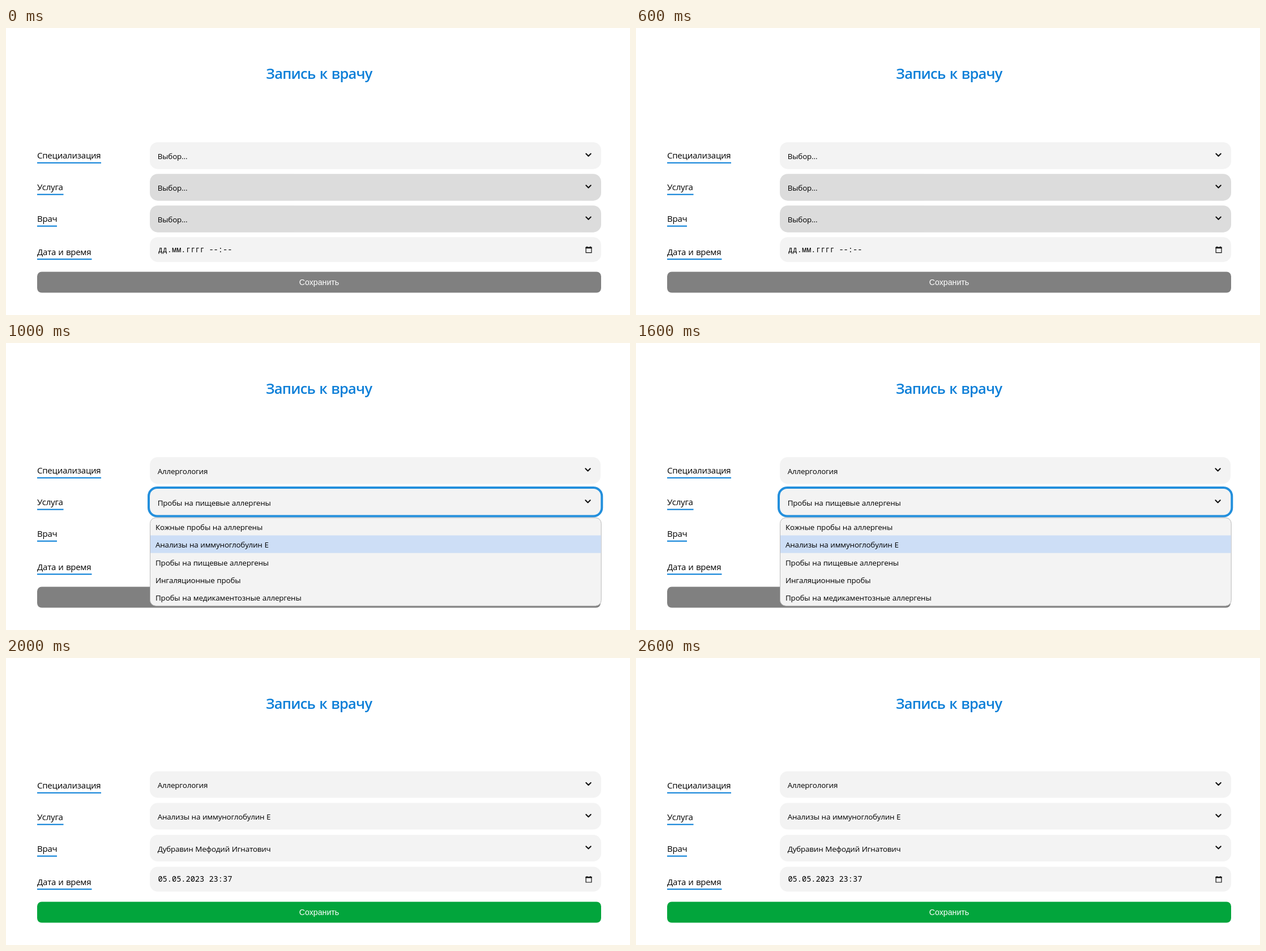
Recreate the animation shown at these times as an HTML page. Size 1102 by 508 pixels, loop 3 s.

```html
<!DOCTYPE html>
<html lang="ru">
<head>
<meta charset="utf-8">
<style>
  html, body { margin: 0; width: 100%; height: 100%; overflow: hidden; background: #fff; }
  svg { display: block; }
  text { font-family: "Open Sans", sans-serif; fill: #000; white-space: pre; }
  .title { font-size: 25.4px; font-weight: 600; letter-spacing: -.72px; word-spacing: 1.4px; fill: #0d7fd8; text-anchor: middle; }
  .label { font-size: 15px; letter-spacing: -.22px; word-spacing: .6px; }
  .value { font-size: 13.4px; letter-spacing: -.17px; word-spacing: .5px; }
  .date { font: 500 13.65px "Noto Sans Mono", monospace; }
  .button { font: 14.2px "Liberation Sans", Arial, sans-serif; fill: #fff; text-anchor: middle; }
  .icon { fill: none; stroke: #111; stroke-width: 2.1; stroke-linecap: round; stroke-linejoin: round; }
</style>
</head>
<body>
<svg id="stage" width="1102" height="508" viewBox="0 0 1102 508"></svg>
<script>
const LIGHT = '#f3f3f3', DISABLED = '#dcdcdc', BLUE = '#0a80d8';

const text = (kind, x, y, content) => `<text class="${kind}" x="${x}" y="${y}">${content}</text>`;
const box = (x, y, w, h, r, fill, extra = '') =>
  `<rect x="${x}" y="${y}" width="${w}" height="${h}" rx="${r}" fill="${fill}" ${extra}/>`;

const label = (content, y, width) =>
  text('label', 55, y, content) + box(55, y + 6.6, width, 2.1, 0, BLUE);

const select = (y, content, fill = LIGHT, height = 47.5, right = 1051) =>
  box(254, y, right - 254, height, 14, fill) +
  text('value', 267.7, y + 29.8, content) +
  `<path class="icon" d="M${right - 26.6} ${y + 20.4}l4.2 4.2 4.2-4.2"/>`;

const dateField = (y, content) =>
  box(254, y, 797, 44, 14, LIGHT) +
  text('date', 268.4, y + 26.7, content) +
  `<path d="M1024.2 ${y + 18.2}h9.8v9.3h-9.8z" fill="none" stroke="#111" stroke-width="1.2"/>
   <path d="M1023.6 ${y + 17.6}h11v2.4h-11zM1025.4 ${y + 16.4}h1.4v2h-1.4zM1031.4 ${y + 16.4}h1.4v2h-1.4z" fill="#111"/>`;

const button = (fill, right = 1051) =>
  box(55, 431.5, right - 55, 37, 8, fill) + text('button', 553, 454.8, 'Сохранить');

const form = (titleX = 553) =>
  box(0, 0, 1102, 508, 0, '#fff') +
  text('title', titleX, 90, 'Запись к врачу') +
  label('Специализация', 231, 113) +
  label('Услуга', 287, 46.5) +
  label('Врач', 343, 35) +
  label('Дата и время', 401.6, 96.5);

const services = [
  'Кожные пробы на аллергены',
  'Анализы на иммуноглобулин E',
  'Пробы на пищевые аллергены',
  'Ингаляционные пробы',
  'Пробы на медикаментозные аллергены'
];

const dropdown = () =>
  box(254.5, 309.3, 796.7, 156, 10, LIGHT, 'stroke="#b9b9b9"') +
  box(255, 340.5, 795.7, 31.2, 0, '#cddef6') +
  services.map((name, i) => text('value', 264, 331.3 + i * 31.1, name)).join('');

const scenes = [
  form() +
    select(202.2, 'Выбор...') +
    select(258.2, 'Выбор...', DISABLED) +
    select(314.2, 'Выбор...', DISABLED) +
    dateField(370.2, 'дд.мм.гггг --:--') +
    button('#808080'),
  form(552.6) +
    select(201.9, 'Аллергология', LIGHT, 47.5, 1050) +
    select(257.9, services[2], LIGHT, 47.5, 1050) +
    box(252, 256, 800.3, 50.6, 15, 'none', 'stroke="#238fdc" stroke-width="4"') +
    button('#808080', 1050) +
    dropdown(),
  form(552.6) +
    select(200.4, 'Аллергология', LIGHT, 47) +
    select(256.6, services[1], LIGHT, 47) +
    select(313, 'Дубравин Мефодий Игнатович', LIGHT, 47) +
    dateField(369.5, '05.05.2023 23:37') +
    button('#02a53c')
];

const stage = document.getElementById('stage');
stage.innerHTML = scenes.map(scene => `<g>${scene}</g>`).join('');
const groups = [...stage.children];
const start = performance.now();

function draw() {
  const active = Math.floor((performance.now() - start) % 3000 / 1000);
  groups.forEach((group, i) => group.style.display = i === active ? '' : 'none');
  requestAnimationFrame(draw);
}
draw();
</script>
</body>
</html>
```
